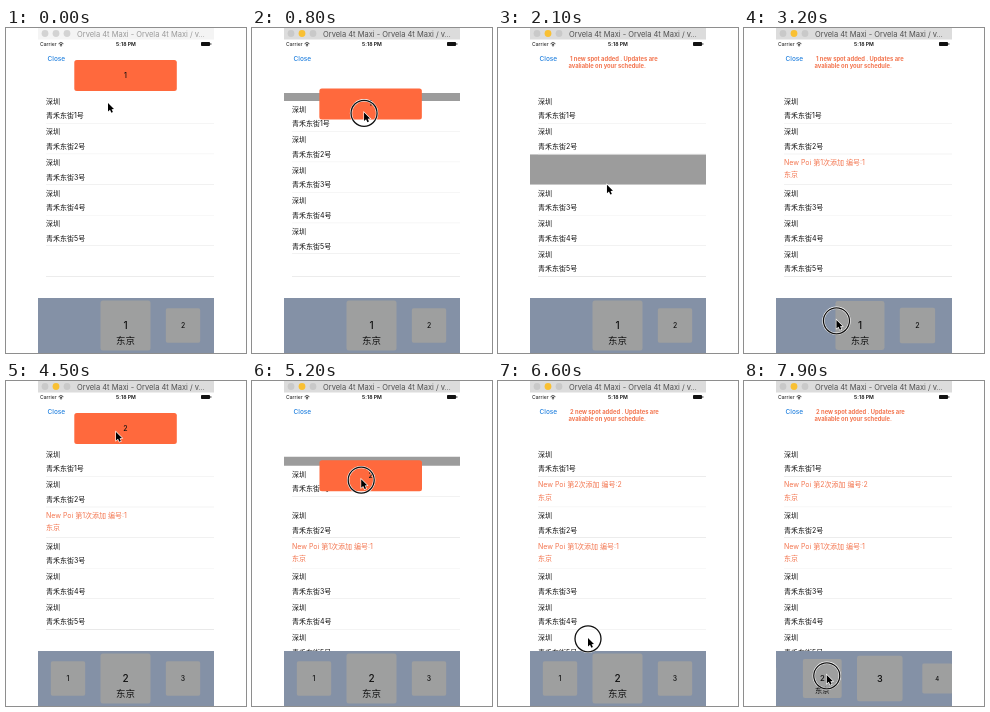
Write an HTML page with a canvas that moves like this. It is 240 by 325 pixels and loops after 8 s.

```html
<!DOCTYPE html>
<html lang="zh">
<head>
<meta charset="utf-8">
<style>
html, body { margin: 0; width: 100%; height: 100%; overflow: hidden; background: #fff; }
canvas { display: block; width: 240px; height: 325px; }
</style>
</head>
<body>
<canvas></canvas>
<script>
const canvas = document.querySelector('canvas');
const c = canvas.getContext('2d');
const dpr = window.devicePixelRatio || 1;
canvas.width = 240 * dpr;
canvas.height = 325 * dpr;

const LOOP = 8000, STEP = 100;
const LEFT = 32, WIDTH = 176, LIST_TOP = 65, ROW = 30.6, PANEL_TOP = 270, SPACING = 57.5;
const INK = '#111', ORANGE = '#ff693d', GREY = '#9c9c9c', SPOT = '#f3754f', LINE = '#e6e6e6';
const FONT = 'Inter, "Noto Sans CJK SC", "Noto Sans CJK", sans-serif';

// Stops of the pointer, with smooth moves between them
const STOPS = [
  { t: 0, x: 102, y: 75 },
  { t: 500, x: 113, y: 56 },
  { t: 1300, x: 110, y: 146 },
  { t: 1900, x: 110, y: 146 },
  { t: 3100, x: 96, y: 292 },
  { t: 3600, x: 62, y: 292 },
  { t: 4400, x: 110, y: 51 },
  { t: 4700, x: 110, y: 51 },
  { t: 5400, x: 109, y: 110 },
  { t: 6200, x: 120, y: 294 },
  { t: 6600, x: 90, y: 257 },
  { t: 6900, x: 90, y: 235 },
  { t: 7500, x: 124, y: 294 },
  { t: 8000, x: 78, y: 294 }
];
const DRAG1 = [500, 1900], SWIPE1 = [3100, 3600], DRAG2 = [4700, 5500];
const PULL = [6600, 6900], SWIPE2 = [7500, LOOP];
const PRESSES = [DRAG1, SWIPE1, DRAG2, PULL, SWIPE2];
const SETTLED = 3900;

const ramp = (t, a, b) => Math.min(1, Math.max(0, (t - a) / (b - a)));
function ease(t, a, b) {
  const p = ramp(t, a, b);
  return p * p * (3 - 2 * p);
}

function pointerAt(t) {
  const i = Math.max(1, STOPS.findIndex(s => s.t >= t));
  const a = STOPS[i - 1], b = STOPS[i];
  const p = ease(t, a.t, b.t);
  return { x: a.x + (b.x - a.x) * p, y: a.y + (b.y - a.y) * p };
}

// How far the pointer has moved within a press
function dragged(t, [down, up]) {
  const from = pointerAt(down), to = pointerAt(Math.min(up, Math.max(down, t)));
  return { x: to.x - from.x, y: to.y - from.y };
}

function rect(x, y, w, h, fill, r = 0) {
  c.fillStyle = fill;
  c.beginPath();
  c.roundRect(x, y, w, h, r);
  c.fill();
}

function disc(x, y, r, fill) {
  c.fillStyle = fill;
  c.beginPath();
  c.arc(x, y, r, 0, 7);
  c.fill();
}

// y is the visual middle of the line
function text(s, x, y, size, fill = INK, align = 'left', weight = 400) {
  c.font = `${weight} ${size}px ${FONT}`;
  c.textAlign = align;
  c.fillStyle = fill;
  c.fillText(s, x, y + size * 0.36);
}

const label = (s, x, y, size) => text(s, x, y, size, INK, 'center', 500);

function clipTo(y, h) {
  c.beginPath();
  c.rect(LEFT, y, WIDTH, h);
  c.clip();
}

function header(t) {
  const active = t >= DRAG1[0];
  rect(LEFT, 0, WIDTH, 11.5, active ? '#dcdcdc' : '#f4f4f4');
  for (let i = 0; i < 3; i++) {
    const idle = active ? '#c9c9c9' : '#d3d3d3';
    disc(39 + 11 * i, 5.5, 3.4, active && i === 1 ? '#f9c033' : idle);
  }
  text('Orvela 4t Maxi - Orvela 4t Maxi / v…', 71, 5.8, 7.5, active ? '#505050' : '#999');

  text('Carrier', 34, 16, 5.1);
  c.strokeStyle = INK;
  c.lineWidth = 0.8;
  for (const r of [1.7, 3.3]) {
    c.beginPath();
    c.arc(55, 18, r, -Math.PI * 0.76, -Math.PI * 0.24);
    c.stroke();
  }
  disc(55, 17.7, 0.7, INK);
  text('5:18 PM', 120, 16, 5.2, INK, 'center', 600);
  rect(195, 14, 9, 4, INK, 0.8);
  rect(204.4, 15.2, 0.9, 1.6, INK);
  text('Close', 41.5, 30.3, 6.5, '#2482df', 'left', 500);
}

function message(n) {
  text(n + ' new spot added . Updates are', 72, 30.5, 5.8, SPOT, 'left', 700);
  text('avaliable on your schedule.', 70.5, 38.2, 5.8, SPOT, 'left', 700);
}

function cell(pos, title, sub, subY, color, shown = 1) {
  const y = LIST_TOP + pos * ROW;
  rect(LEFT, y, WIDTH, ROW, '#fff');
  c.globalAlpha = 1 - shown;
  rect(LEFT, y, WIDTH, ROW, GREY);
  c.globalAlpha = shown;
  text(title, 40, y + 8.2, 7, color);
  text(sub, 40, y + subY, 7, color);
  rect(40, y + ROW - 0.5, WIDTH - 8, 0.6, LINE);
  c.globalAlpha = 1;
}

function list(t) {
  const open1 = ease(t, 700, 1000), open2 = ease(t, 4900, 5150);
  const pass0 = ease(t, 900, 1150), pass1 = ease(t, 1090, 1330), pass2 = ease(t, 5100, 5350);
  c.save();
  clipTo(LIST_TOP, PANEL_TOP - LIST_TOP);
  c.translate(0, dragged(t, PULL).y * (1 - ease(t, PULL[1], 7200)));
  rect(40, LIST_TOP + 6 * ROW - 0.5, WIDTH - 8, 0.6, LINE);

  const spot = (n, pos, fade) =>
    cell(pos, `New Poi 第${n}次添加 编号:${n}`, '东京', 20.4, SPOT, ramp(t, fade, fade + 500));
  if (open1) spot(1, pass0 + pass1 + open2, 2200);
  if (open2) spot(2, pass2, 5840);

  const passed = [pass0 + pass2, pass1];
  for (let i = 0; i < 5; i++) {
    const pos = i + open1 + open2 - (passed[i] || 0);
    cell(pos, '深圳', `青禾东街${i + 1}号`, 22.8, INK);
  }
  c.restore();
}

function carousel(t) {
  const first = dragged(t, SWIPE1).x;
  const snap = (-SPACING - first) * ease(t, SWIPE1[1], SETTLED);
  const shift = first + snap + dragged(t, SWIPE2).x;
  const chosen = t < SETTLED ? 1 : 2;
  c.save();
  clipTo(PANEL_TOP, 55);
  rect(LEFT, PANEL_TOP, WIDTH, 55, '#8491a6');
  for (let n = 1; n <= 5; n++) {
    const d = (n - 1) * SPACING + shift;
    if (Math.abs(d) > 120) continue;
    const w = 50 - 0.272 * Math.abs(d), x = 119.5 + d;
    rect(x - w / 2, 297.5 - w / 2, w, w, '#9e9f9f', w * 0.05);
    label(n, x, 297.5, w * 0.2);
    if (n === chosen) label('东京', x, 297.5 + w * 0.3, w * 0.19);
  }
  c.restore();
}

function floatingCard(n, { x, y }) {
  rect(68.3 + x, 32 + y, 102.5, 31, ORANGE, 2.5);
  label(n, 119.5 + x, 47.5 + y, 7);
}

function pointer({ x, y }, pressed) {
  c.save();
  c.translate(x, y);
  if (pressed) {
    c.beginPath();
    c.arc(0, 0.8, 13, 0, 7);
    c.strokeStyle = '#fff';
    c.lineWidth = 2.4;
    c.stroke();
    c.strokeStyle = INK;
    c.lineWidth = 1.3;
    c.stroke();
  }
  const arrow = new Path2D('M0 0V8.4L2 6.7 3.4 9.8 4.9 9.1 3.6 6.2 6 6Z');
  c.strokeStyle = '#fff';
  c.lineWidth = 1.2;
  c.stroke(arrow);
  c.fillStyle = '#000';
  c.fill(arrow);
  c.restore();
}

function draw(now) {
  const t = Math.floor((now % LOOP) / STEP) * STEP;
  c.setTransform(dpr, 0, 0, dpr, 0, 0);
  rect(0, 0, 240, 325, '#fff');
  header(t);
  list(t);
  carousel(t);
  if (t < DRAG1[1]) floatingCard(1, dragged(t, DRAG1));
  else if (t < SETTLED) message(1);
  else if (t < DRAG2[1]) floatingCard(2, dragged(t, DRAG2));
  else message(2);
  pointer(pointerAt(t), PRESSES.some(([down, up]) => t >= down && t < up));
}

const start = performance.now();
function loop() {
  draw(performance.now() - start);
  requestAnimationFrame(loop);
}
loop();
</script>
</body>
</html>
```
